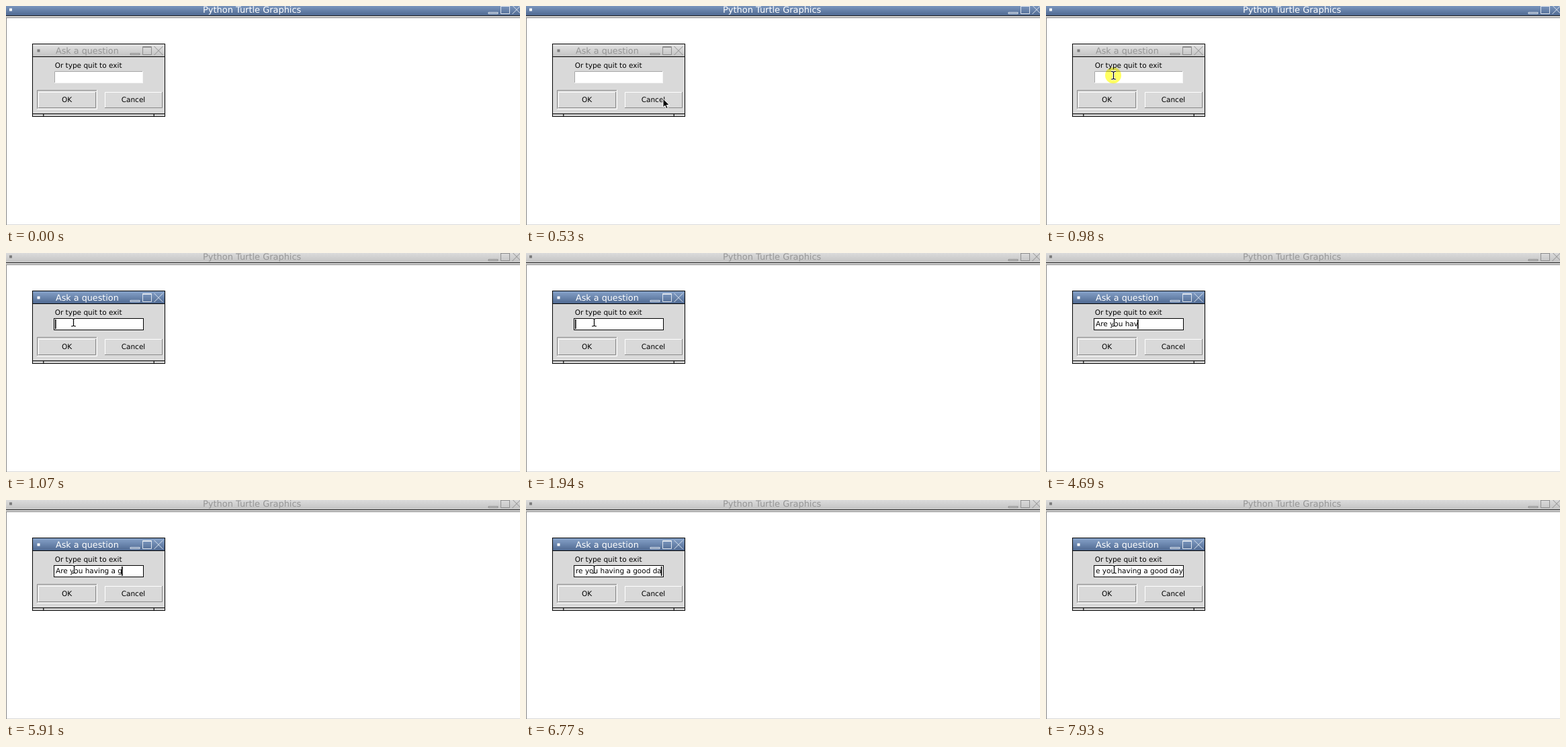
An HTML page that plays this animation: 765 px wide and 326 px high, repeating every 8 s.

```html
<!DOCTYPE html>
<html lang="en">
<head>
<meta charset="utf-8">
<title>Ask a question</title>
<style>
  html, body { margin: 0; width: 100%; height: 100%; overflow: hidden; background: #fff; }
  svg { display: block; }
  text { font: 10.5px "DejaVu Sans", Verdana, sans-serif; text-rendering: geometricPrecision; white-space: pre; fill: #000; }
  .mid { text-anchor: middle; }
  .bar { fill: url(#idle); }
  .caption { fill: #969696; }
  .icon { fill: #7d7d7d; }
  .lines { fill: none; stroke: #8e8e8e; }
  .active .bar { fill: url(#blue); }
  .active .caption, .active .icon { fill: #fff; }
  .active .lines { stroke: #dfe6ef; }
</style>
</head>
<body>
<svg id="stage" width="765" height="326" viewBox="0 0 765 326"></svg>
<script>
const LOOP = 8000;
const FOCUS = 1070, PRESS = 980, NUDGE = 1330;
const MOVE = { start: 150, step: 92, count: 8, from: [515, 242], to: [100, 103] };
const MESSAGE = 'Are you having a good day';
const KEYS = [2650, 2880, 3120, 3270, 3400, 3520, 3750, 4050, 4450, 4530, 4690, 4850, 5000,
  5100, 5530, 5530, 5610, 5910, 6010, 6110, 6260, 6410, 6580, 6760, 6940];
const BLINKS = [1070, 1710, 1940, 2510, 2780, 3400, 3660, 4370, 4690, 5230, 5530,
  6110, 6410, 7020, 7320, 7930];
const ENTRY = { x: 74, room: 130.5 };

const rect = (x, y, w, h, fill, more = '') =>
  `<rect x="${x}" y="${y}" width="${w}" height="${h}" fill="${fill}" ${more}/>`;

const bevel = (x, y, w, h, light, dark) =>
  `<g fill="none"><path stroke="${light}" d="M${x + .5} ${y + h}V${y + .5}H${x + w}"/>
   <path stroke="${dark}" d="M${x} ${y + h - .5}H${x + w - .5}V${y}"/></g>`;

const gradient = (id, top, bottom) =>
  `<linearGradient id="${id}" x2="0" y2="1"><stop stop-color="${top}"/>
   <stop offset="1" stop-color="${bottom}"/></linearGradient>`;

// Minimise, maximise and close marks, placed relative to the dialog's title bar
const marks = (dx, dy) => `<g class="lines" transform="translate(${dx} ${dy})">
  <path d="M185 70.5H199V72.5H185Z"/>
  <path d="M203.5 60.5H216.5V72.5H203.5ZM203.5 61.5H216.5"/>
  <path d="M220.5 60L233.5 73M233.5 60L220.5 73"/></g>`;

const button = (x, label) =>
  bevel(x, 128, 86, 24, '#fff', '#8a8a8a') +
  `<text class="mid" x="${x + 42.5}" y="143">${label}</text>`;

const beam = 'M-3.5 -5.5H-1.5L0 -4.5L1.5 -5.5H3.5M0 -4.5V5M-3.5 6H-1.5L0 5L1.5 6H3.5';

const stage = document.getElementById('stage');
stage.innerHTML = `
  <defs>
    ${gradient('blue', '#86a2c9', '#506a92')}
    ${gradient('idle', '#e2e2e2', '#c3c3c3')}
    <clipPath id="inside">${rect(72, 98, 132, 17, '#000')}</clipPath>
  </defs>
  ${rect(0, 0, 765, 326, '#fff')}
  <g id="main">
    <rect class="bar" y="-4" width="765" height="18"/>
    <rect class="icon" x="5" y="3.5" width="4" height="4"/>
    <text class="caption" x="293" y="10.3" style="font-size:12.95px">Python Turtle Graphics</text>
    ${marks(533, -61)}
  </g>
  ${rect(0, 14, 765, 1, '#222')}
  ${rect(0, 15, 765, 2, '#d9d9d9')}
  ${rect(0, 17, 765, 1, '#868686')}
  ${rect(0, 17, 1, 309, '#868686')}
  ${rect(1, 325, 764, 1, '#d9d9d9')}

  ${rect(39, 56, 198, 109, '#000')}
  ${rect(40, 76, 196, 84, '#d9d9d9')}
  ${rect(40, 161, 196, 3, '#d4d4d4')}
  ${rect(55, 161, 1.5, 3, '#333')}
  ${rect(219.5, 161, 1.5, 3, '#333')}
  <g id="dialog">
    <rect class="bar" x="40" y="57" width="196" height="18"/>
    <rect class="icon" x="46.5" y="64.5" width="4" height="4"/>
    <text class="caption" x="74" y="71.2" style="font-size:12.75px">Ask a question</text>
    ${marks(0, 0)}
  </g>
  <text x="72.7" y="92">Or type quit to exit</text>
  ${rect(72, 97, 132, 18, '#fff')}
  <g id="plain">${bevel(72, 97, 132, 18, '#a6a6a6', '#f4f4f4')}</g>
  ${rect(71.5, 97.5, 133, 17, 'none', 'id="ring" stroke="#000"')}
  <g clip-path="url(#inside)">
    <text id="typed" x="${ENTRY.x}" y="109.3"></text>
    ${rect(0, 99, 1.6, 14, '#000', 'id="caret"')}
  </g>
  ${bevel(46, 125, 90, 29, '#8a8a8a', '#fff')}
  ${button(48, 'OK')}
  ${button(147, 'Cancel')}

  <circle id="halo" cx="100" cy="103.3" r="12" fill="#ff0" fill-opacity=".62" style="mix-blend-mode:multiply"/>
  <path id="arrow" d="M0 0V13L3 10.2L5 15L7.2 14L5.2 9.5H9.3Z" fill="#000" stroke="#fff"/>
  <g id="beam" fill="none">
    <path d="${beam}" stroke="#fff" stroke-width="3" class="glow"/>
    <path d="${beam}" stroke="#000" stroke-width="1.2"/>
  </g>`;

const part = {};
for (const el of stage.querySelectorAll('[id]')) part[el.id] = el;

const show = (el, on) => el.setAttribute('visibility', on ? 'visible' : 'hidden');
const place = (el, x, y) => el.setAttribute('transform', `translate(${x} ${y})`);
const passed = (times, t) => times.filter(time => time <= t).length;

function drawPointer(t) {
  const { start, step, count, from, to } = MOVE;
  const p = Math.min(1, Math.max(0, Math.floor((t - start) / step) / count));
  const eased = 1 - (1 - p) ** 2;
  const [x, y] = from.map((a, i) => Math.round(a + (to[i] - a) * eased));
  const overEntry = x >= 72 && x < 204 && y >= 97 && y < 115;
  show(part.arrow, t >= start && !overEntry);
  show(part.beam, overEntry);
  show(part.halo, t >= PRESS && t < FOCUS);
  place(part.arrow, x, y);
  place(part.beam, x + (t >= NUDGE ? 1.5 : .5), y);
}

// Whole characters scroll off the left until the rest fits
function drawEntry(t) {
  let text = MESSAGE.slice(0, passed(KEYS, t));
  let width = 0;
  part.typed.textContent = text;
  while (text && (width = part.typed.getComputedTextLength()) > ENTRY.room) {
    text = text.slice(1);
    part.typed.textContent = text;
  }
  part.caret.setAttribute('x', Math.min(ENTRY.x - 1 + width, 202));
  show(part.caret, passed(BLINKS, t) % 2 === 1);
}

function draw(t) {
  const focused = t >= FOCUS;
  part.main.classList.toggle('active', !focused);
  part.dialog.classList.toggle('active', focused);
  show(part.ring, focused);
  show(part.plain, !focused);
  drawEntry(t);
  drawPointer(t);
}

const begin = performance.now();
function tick() {
  draw((performance.now() - begin) % LOOP);
  requestAnimationFrame(tick);
}
tick();
</script>
</body>
</html>
```
